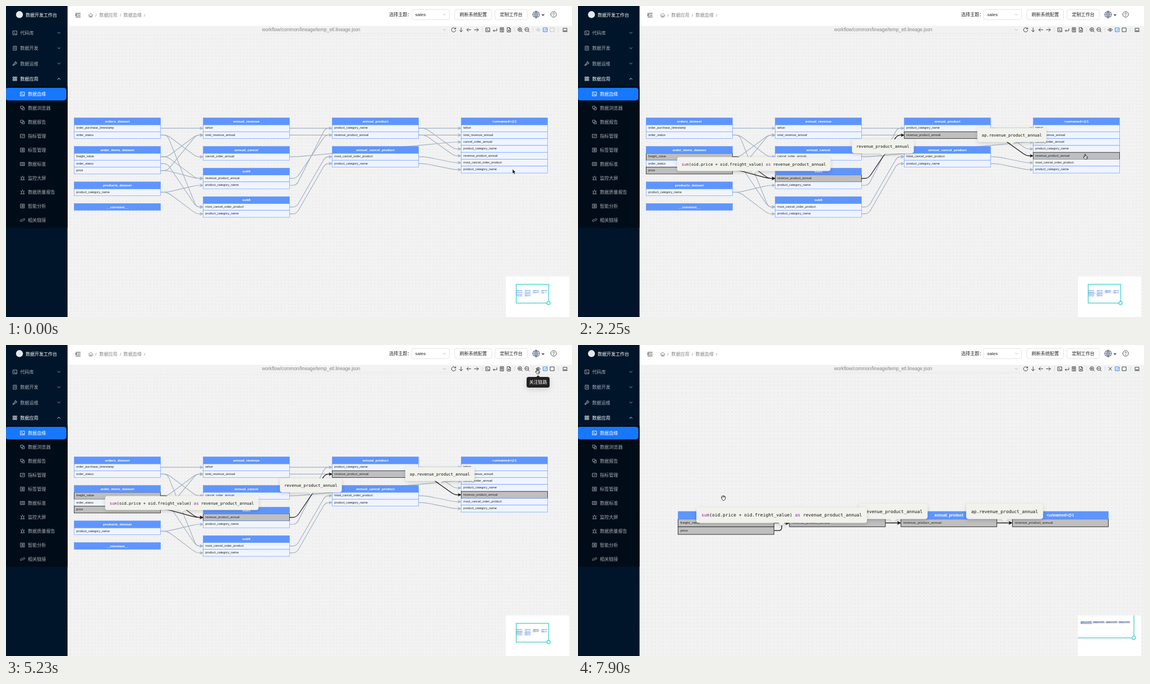
These frames come from a looping animation (1009x555 px, 8 s). An HTML page:

```html
<!DOCTYPE html>
<html lang="zh">
<head>
<meta charset="utf-8">
<title>数据血缘</title>
<style>
html, body { margin: 0; width: 100%; height: 100%; overflow: hidden; background: #f2f2f2; }
svg { display: block; }
text { font-family: "Liberation Sans", Arial, "Noto Sans CJK SC", "Noto Sans CJK", sans-serif; font-size: 8.1px; }
.icon { fill: none; stroke-width: .9; stroke-linecap: round; stroke-linejoin: round; }
.node text { font-size: 9px; fill: #262626; }
.node .title { font-size: 10px; font-weight: bold; fill: #fff; text-anchor: middle; }
.node rect { fill: #eff4ff; stroke: #5f95ff; }
.node .head { fill: #5f95ff; }
.edge { stroke: #a2b1c3; fill: #a2b1c3; stroke-width: 1.9; }
.edge .line { fill: none; }
.on .edge.hot { stroke: #111; fill: #111; }
.on rect.hot { fill: #bfbfbf; stroke: #222; stroke-width: 1.3; }
.tip { filter: drop-shadow(0 3px 5px rgba(0,0,0,.16)); }
.tip path { fill: #f2f2ed; }
.tip text { font: 11.6px "DejaVu Sans Mono", monospace; fill: #111; }
.tip tspan { fill: #93219e; }
.cursor { stroke: #111; stroke-width: .9; fill: #fff; stroke-linejoin: round; }
</style>
</head>
<body>
<svg id="stage" width="100%" height="100%" viewBox="0 0 1009 555"></svg>
<script>
const stage = document.getElementById('stage');
const $ = id => document.getElementById(id);

// ---------- helpers ----------
const rect = (x, y, w, h, attrs = '') =>
  `<rect x="${x}" y="${y}" width="${w}" height="${h}" ${attrs}/>`;
const label = (x, y, text, fill, attrs = '') =>
  `<text x="${x}" y="${y + 2.9}" fill="${fill}" ${attrs}>${text}</text>`;
const icon = (name, x, y, color, attrs = '') =>
  `<path class="icon" d="${ICONS[name]}" transform="translate(${x} ${y})" stroke="${color}" ${attrs}/>`;

const SQUARE = 'M-3.4-3.4H3.4V3.4H-3.4Z';
const ROUND = 'M-4-.5a3.4 3.4 0 1 0 6.8 0a3.4 3.4 0 1 0-6.8 0M2 2L4 4';
const ICONS = {
  code: SQUARE + 'M-1.8-1.4L-.2 0L-1.8 1.4M.4 1.6H2',
  table: 'M-2.8-3.6H2.8V3.6H-2.8ZM-1.4-1.4H1.4M-1.4.8H1.4',
  tool: 'M-3.4 3.4L.4-.4M-3.4 3.4L-2 3.6L1 .8A2.2 2.2 0 0 0 3.4-1.8L2-.8L.8-2L2-3.4A2.2 2.2 0 0 0-.4-1L-3.6 2Z',
  apps: 'M-3.2-3.2h2.4v2.4h-2.4zM.8-3.2h2.4v2.4h-2.4zM-3.2.8h2.4v2.4h-2.4zM.8.8h2.4v2.4h-2.4z',
  copy: 'M-3.2-3.2H.8V.8H-3.2ZM.8-1.2H3.2V3.2H-1.2V.8',
  chart: 'M-3.6-3H3.6V3H-3.6ZM-2 1L-.6-.6L.6.4L2.2-1.4',
  list: SQUARE + 'M-1.6-1.4H1.6M-1.6 0H1.6M-1.6 1.4H1.6',
  grid: 'M-3.6-2.8H3.6V2.8H-3.6ZM-2-1H-.6M.6-1H2M-2 1H-.6M.6 1H2',
  alarm: 'M-2.2 2.4V0a2.2 2.2 0 0 1 4.4 0V2.4M-3.4 3.2H3.4M0-3.8V-3M-3.4-2L-2.8-1.6M3.4-2L2.8-1.6',
  link: 'M-.8 1.4L-2 2.6A1.3 1.3 0 0 1-3-.2L-1.2-1.6M.8-1.4L2-2.6A1.3 1.3 0 0 1 3 .2L1.2 1.6M-1 .9L1-.9',
  down: 'M-2.2-1.1L0 1.1L2.2-1.1',
  up: 'M-2.2 1.1L0-1.1L2.2 1.1',
  fold: 'M-4-3.2H4M-.8 0H4M-4 3.2H4M-4-1.2V1.2L-2.4 0Z',
  home: 'M-4 .2L0-3.6L4 .2M-2.8-.6V3.4H2.8V-.6M-.8 3.4V1H.8V3.4',
  globe: 'M-6 0a6 6 0 1 0 12 0a6 6 0 1 0-12 0M-6 0H6M0-6V6M-5-3H5M-5 3H5M0-6Q-5.4 0 0 6Q5.4 0 0-6',
  help: 'M-5 0a5 5 0 1 0 10 0a5 5 0 1 0-10 0M-1.5-1a1.5 1.5 0 1 1 2.4 1.1Q0 .6 0 1.3M0 2.7V2.8',
  refresh: 'M3.4-1.8A3.8 3.8 0 1 0 3.8 .8M3.7-3.8V-1.6H1.5',
  south: 'M0-3.6V3.4M-2.8 .8L0 3.6L2.8 .8',
  west: 'M3.6 0H-3.4M-.6-3L-3.6 0L-.6 3',
  east: 'M-3.6 0H3.4M.6-3L3.6 0L.6 3',
  enter: 'M3.2-2V1.6H-3.2M-1.6.2L-3.2 1.6L-1.6 3',
  doc: 'M-2.8-3.8H2.8V3.8H-2.8ZM-1.2-2H1.2V0H-1.2ZM-1.2 2H1.2',
  file: 'M-2.8-3.8H1L2.8-2V3.8H-2.8ZM.8-3.8V-1.8H2.8M0-.2V2.4M-1.3 1.1H1.3',
  zoomIn: ROUND + 'M-2.2-.5H1M-.6-2.1V1.1',
  zoomOut: ROUND + 'M-2.2-.5H1',
  eye: 'M-4 0Q0-5.2 4 0Q0 5.2-4 0M-1.2 0a1.2 1.2 0 1 0 2.4 0a1.2 1.2 0 1 0-2.4 0',
  check: SQUARE + 'M-1.7 0L-.4 1.3L1.8-1.4',
  square: SQUARE,
  close: 'M-2.5-2.7L2.5 2.7M2.5-2.7L-2.5 2.7',
  laptop: 'M-3.2-2.8H3.2V1.6H-3.2ZM-4 3.2H4'
};

// ---------- lineage graphs ----------
const WIDTH = 250, ROW = 20;
const SUM = '<tspan>sum</tspan>(oid.price + oid.freight_value) <tspan>as</tspan> revenue_product_annual';
const REV = 'revenue_product_annual';

const full = {
  id: 'full', s: .615, ox: 121.6, oy: 199.7, step: 374, gap: 22.8, stub: 20, bend: 13,
  columns: [
    ['orders_dataset order_purchase_timestamp order_status',
     'order_items_dataset freight_value order_status price',
     'products_dataset product_category_name', '__constant__'],
    ['annual_revenue tahun total_revenue_annual', 'annual_cancel cancel_order_annual',
     'sub5 revenue_product_annual product_category_name',
     'sub6 most_cancel_order_product product_category_name'],
    ['annual_product product_category_name revenue_product_annual',
     'annual_cancel_product most_cancel_order_product product_category_name'],
    ['&lt;unnamed&gt;@1 tahun total_revenue_annual cancel_order_annual product_category_name ' +
     'revenue_product_annual most_cancel_order_product product_category_name']
  ],
  edges: '0.1-4.1 0.2-5.1 0.2-7.1 1.1-4.2 1.2-7.1 1.3-4.2 2.1-6.2 2.1-7.2 4.1-10.1 4.2-10.2 5.1-10.3 ' +
    '6.2-8.1 7.1-9.1 7.2-9.2 8.1-10.4 9.1-10.6 9.2-10.7 1.1-6.1! 1.3-6.1! 6.1-8.2! 8.2-10.5!',
  tips: [['8.2-10.5', 'ap.' + REV], ['6.1-8.2', REV], ['1.3-6.1', SUM]]
};
const focus = {
  id: 'focus', s: .684, ox: 178.3, oy: 297, step: 290.5, gap: 0, stub: 0, bend: 8,
  columns: [['order_items_dataset freight_value price'], ['sub5 ' + REV],
    ['annual_product ' + REV], ['&lt;unnamed&gt;@1 ' + REV]],
  edges: '0.1-1.1! 0.2-1.1! 1.1-2.1! 2.1-3.1!',
  tips: [['2.1-3.1', 'ap.' + REV], ['1.1-2.1', REV], ['0.2-1.1', SUM]]
};

// Polyline with rounded corners
function rounded(pts, r) {
  let d = `M${pts[0]}`;
  for (let i = 1; i < pts.length - 1; i++) {
    const [x, y] = pts[i];
    const toward = ([px, py]) => {
      const len = Math.hypot(px - x, py - y) || 1, k = Math.min(r, len / 2) / len;
      return [x + (px - x) * k, y + (py - y) * k];
    };
    d += `L${toward(pts[i - 1])}Q${[x, y]} ${toward(pts[i + 1])}`;
  }
  return d + `L${pts[pts.length - 1]}`;
}

function tipBubble(x, y, text) {
  const chars = text.replace(/<[^>]+>/g, '').length;
  const w = chars * 6.98 + 26, l = -w / 2;
  return `<g class="tip" transform="translate(${x} ${y})">
    <path d="M${l + 7}-50.6H${-l - 7}q7 0 7 7V-17q0 7-7 7H8L0-3L-8-10H${l + 7}q-7 0-7-7V-43.6q0-7 7-7Z"/>
    <text x="${l + 13}" y="-26.3">${text}</text></g>`;
}

function buildGraph(g) {
  const nodes = [], hot = new Set();
  g.columns.forEach((column, c) => {
    let y = 0;
    for (const spec of column) {
      const [title, ...rows] = spec.split(' ');
      nodes.push({ x: c * g.step, y, title, rows });
      y += (rows.length + 1) * ROW + g.gap;
    }
  });
  const ends = edge => edge.replace('!', '').split('-').map((key, i) => {
    const [n, r] = key.split('.').map(Number);
    return [nodes[n].x + (i ? 0 : WIDTH), nodes[n].y + (r + .5) * ROW];
  });
  const edges = g.edges.split(' ').map(edge => {
    const [[x1, y1], [x2, y2]] = ends(edge);
    const isHot = edge.endsWith('!'), mid = (x1 + x2) / 2;
    if (isHot) edge.slice(0, -1).split('-').forEach(k => hot.add(k));
    const a = g.stub ? x1 + g.stub : mid, b = g.stub ? x2 - g.stub : mid;
    const pts = y1 === y2 ? [[x1, y1], [x2 - 3, y2]] : [[x1, y1], [a, y1], [b, y2], [x2 - 3, y2]];
    return `<g class="edge ${isHot ? 'hot' : ''}"><path class="line" d="${rounded(pts, g.bend)}"/>
      <path stroke-width=".6" d="M${x2} ${y2}l-9.5-4.4l2.4 4.4l-2.4 4.4Z"/></g>`;
  }).join('');
  const boxes = nodes.map((n, i) => {
    const row = (name, r) => rect(0, r * ROW + ROW, WIDTH, ROW, hot.has(`${i}.${r + 1}`) ? 'class="hot"' : '') +
      `<text x="6" y="${r * ROW + ROW + 12}">${name}</text>`;
    return `<g class="node" transform="translate(${n.x} ${n.y})">${n.rows.map(row).join('')}
      ${rect(0, 0, WIDTH, ROW, 'class="head"')}
      <text class="title" x="${WIDTH / 2}" y="13.4">${n.title}</text></g>`;
  }).join('');
  const tips = g.tips.map(([edge, text]) => {
    const [[x1, y1], [x2, y2]] = ends(edge);
    return tipBubble((x1 + x2) / 2, (y1 + y2) / 2, text);
  }).join('');
  const place = `transform="translate(${g.ox} ${g.oy}) scale(${g.s})"`;
  return { graph: `<g id="${g.id}" ${place}>${edges}${boxes}</g>`, tips: `<g id="${g.id}Tips" ${place}>${tips}</g>` };
}

// ---------- page chrome ----------
function sidebar() {
  const dim = '#a6adb4';
  const top = [['code', '代码库'], ['table', '数据开发'], ['tool', '数据运维'], ['apps', '数据应用']];
  const sub = [['code', '数据血缘'], ['copy', '数据浏览器'], ['copy', '数据报告'], ['chart', '指标管理'], ['list', '标签管理'],
    ['grid', '数据标准'], ['alarm', '监控大屏'], ['alarm', '数据质量报告'], ['list', '智能分析'], ['link', '相关链接']];
  return rect(0, 0, 109.7, 555, 'fill="#001529"') + rect(0, 143.5, 109.7, 252, 'fill="#000c17"') +
    rect(-1, 146, 108.7, 22.4, 'rx="4.5" fill="#1677ff"') +
    '<circle cx="24" cy="15.3" r="6.2" fill="#e6e8ea"/>' +
    label(35, 16.3, '数据开发工作台', '#fff', 'style="font-size:8px;font-weight:500"') +
    top.map(([ic, text], i) => {
      const y = 48 + i * 27.3, color = i === 3 ? '#fff' : dim;
      return icon(ic, 16, y, color) + label(25.2, y, text, color) + icon(i === 3 ? 'up' : 'down', 94.3, y, color);
    }).join('') +
    sub.map(([ic, text], i) => {
      const y = 157 + i * 25, color = i ? dim : '#fff';
      return icon(ic, 29.5, y, color) + label(39, y, text, color);
    }).join('');
}

function header() {
  const ink = '#262626', grey = '#858585';
  const box = (x, w) => rect(x, 6.3, w, 18, 'rx="3.2" fill="#fff" stroke="#d9d9d9" stroke-width=".7"');
  return rect(109.7, 0, 900, 35.5, 'fill="#fff"') +
    icon('fold', 128.5, 16.3, ink) + icon('home', 151, 16.3, grey) +
    [[159.3, '/'], [166.3, '数据应用'], [203, '/'], [209.6, '数据血缘'], [246, '/']]
      .map(([x, text]) => label(x, 16.3, text, grey)).join('') +
    label(683, 15.3, '选择主题：', ink) + box(723, 67.6) + label(729.5, 15.3, 'sales', ink) +
    icon('down', 781.5, 15.5, '#bbb') +
    box(800, 65.6) + label(808.7, 15.3, '刷新系统配置', ink) +
    box(871.7, 57.6) + label(880.4, 15.3, '定制工作台', ink) +
    icon('globe', 945, 15.2, '#52617d') + '<path d="M954.3 14.8h6l-3 3.4Z" fill="#52617d"/>' +
    icon('help', 976.2, 15, '#444');
}

function toolbar() {
  const ink = '#333';
  const items = { refresh: 798, south: 811.3, west: 825, east: 838.6, code: 859, enter: 871.8, doc: 884.2,
    file: 896.6, zoomIn: 916.6, zoomOut: 929, laptop: 996.7 };
  return label(456.5, 42.5, 'workflow/common/lineage/temp_etl.lineage.json', '#858585', 'style="font-size:8.24px"') +
    rect(452, 48.7, 336, .6, 'fill="#e2e2e2"') + icon('down', 781.5, 42.7, '#aaa') +
    Object.entries(items).map(([name, x]) => icon(name, x, 42.5, ink)).join('') +
    [848.7, 906.3, 939, 984.4].map(x => rect(x, 38.5, .7, 8, 'fill="#d2d2d2"')).join('') +
    icon('eye', 948.8, 42.5, ink, 'id="eye"') + icon('close', 948.8, 42.5, ink, 'id="close"') +
    icon('check', 961.4, 42.5, '#1677ff') + icon('square', 973.8, 42.5, ink, 'id="box"');
}

const hint = (id, text) => {
  const w = text.length * 7.9 + 9.4;
  return `<g id="${id}" style="filter:drop-shadow(0 3px 5px rgba(0,0,0,.14))">
    <path d="M945 57.5l3.6-3.6l3.6 3.6Z" fill="#222"/>${rect(948.6 - w / 2, 57, w, 19, 'rx="3.5" fill="#222"')}
    ${label(948.6, 66.4, text, '#fff', 'text-anchor="middle" style="font-size:7.9px"')}</g>`;
};

const minimap = () => rect(891, 482.5, 113, 72.5, 'fill="#fff"') +
  `<clipPath id="mapClip">${rect(891, 482.5, 113, 72.5)}</clipPath>
  <g clip-path="url(#mapClip)"><g id="map"><use href="#full"/><use href="#focus"/></g>
  <rect id="view" fill="none" stroke="#31d0c6" stroke-width="1.2"/></g>
  <circle id="handle" r="3" fill="#fff" stroke="#31d0c6" stroke-width="1.2"/>`;

const cursors = () => `<g id="cursor">
  <path id="arrow" d="M0 0V7.8L1.8 6.1L3 9L4.4 8.4L3.2 5.6L5.6 5.5Z" fill="#000" stroke="#fff" stroke-width=".5"/>
  <path id="finger" class="cursor" d="M-1.8-3.9a.8.8 0 0 1 1.6 0V-1.2l2.6.5q1.1.3 1 1.4l-.4 2q-.3 1.7-1.7 1.7H-.6q-1 0-1.6-.9l-1.8-2.7q-.3-.9.6-1l1.6.8ZM.6 1V2.6M2 1V2.6"/>
  <path id="grab" class="cursor" d="M-3.4.7q-1.4-1.6-.2-1.8l1 .6l-.7-2.3q.5-1.3 1.4-.3q.3-1.3 1.4-.9q.9-.5 1.3.5q1.3-.3 1.3.9q1.4-.1 1.2 1.2l-.5 2.8q-.4 2.6-1.8 2.9H-1q-1-.3-2.4-3.6ZM-.6-3L-.4-1M1.2-2.8V-1"/></g>`;

const graphs = [full, focus].map(buildGraph);
stage.innerHTML = `<defs><pattern id="dots" width="10" height="10" patternUnits="userSpaceOnUse">
  ${rect(0, 0, 1, 1, 'fill="#aaa"')}</pattern></defs>` +
  rect(0, 0, 1009, 555, 'fill="#f2f2f2"') + rect(109.7, 50, 900, 505, 'fill="url(#dots)"') +
  graphs.map(g => g.graph).join('') + graphs.map(g => g.tips).join('') +
  minimap() + header() + toolbar() + sidebar() +
  rect(1008, 135, 1, 173, 'id="scroll" fill="#7d7d7d"') +
  hint('follow', '关注链路') + hint('unfollow', '取消关注链路') + cursors();

// ---------- motion ----------
const LOOP = 8000;
const PATH = [ // time, x, y
  [0, 903, 291.3], [140, 902, 288.5], [470, 905, 269],
  [3150, 909, 235], [3300, 916, 168], [3440, 914, 122], [3590, 911, 102],
  [3890, 907, 94], [4040, 904, 87],
  [4340, 907, 84], [4490, 918, 74], [4640, 931, 62], [4780, 942, 52], [4930, 948, 47],
  [7300, 800, 95], [7450, 610, 165], [7600, 420, 232], [7750, 302, 263], [7900, 259.5, 273]
];
const show = (id, on) => { $(id).style.display = on ? '' : 'none'; };
const fade = (id, alpha) => { show(id, alpha > 0); $(id).style.opacity = alpha; };
const appear = (t, half, whole) => t < half ? 0 : t < whole ? .6 : 1;

function placeMap(x, y, k) {
  $('map').setAttribute('transform', `translate(${x} ${y}) scale(${k}) translate(-110 -36)`);
  const w = 899 * k, h = 519 * k;
  Object.entries({ x, y, width: w, height: h }).forEach(([name, v]) => $('view').setAttribute(name, v));
  $('handle').setAttribute('cx', x + w - .3);
  $('handle').setAttribute('cy', y + h - .1);
}

function render(t) {
  const focused = t >= 6280, scene = focused ? focus : full;
  show('full', !focused);
  show('focus', focused);
  $('full').setAttribute('class', t >= 620 ? 'on' : '');
  $('focus').setAttribute('class', 'on');
  fade('fullTips', focused ? 0 : appear(t, 760, 910));
  fade('focusTips', appear(t, 6420, 6570));
  $('dots').setAttribute('patternTransform', `translate(${scene.ox} ${scene.oy}) scale(${scene.s})`);

  if (!focused) placeMap(909.5, 496.7, .0645);
  else if (t < 6420) placeMap(892, 492, .0584);
  else placeMap(888.3, 463.3, .1143);

  const tint = t < 2250 ? '#c4c4c4' : '#333';
  $('eye').setAttribute('stroke', tint);
  $('box').setAttribute('stroke', tint);
  show('eye', !focused);
  show('close', focused);
  show('scroll', focused && t < 6860);
  fade('follow', focused ? 0 : appear(t, 5080, 5230));
  show('unfollow', focused && t < 7300);

  const [, x, y] = PATH.filter(p => p[0] <= t).pop();
  $('cursor').setAttribute('transform', `translate(${x} ${y})`);
  const kind = t < 470 ? 'arrow' : y < 50 || (!focused && y > 200) ? 'finger' : 'grab';
  ['arrow', 'finger', 'grab'].forEach(id => show(id, id === kind));
}

const start = performance.now();
function tick() {
  render((performance.now() - start) % LOOP);
  requestAnimationFrame(tick);
}
tick();
</script>
</body>
</html>
```
